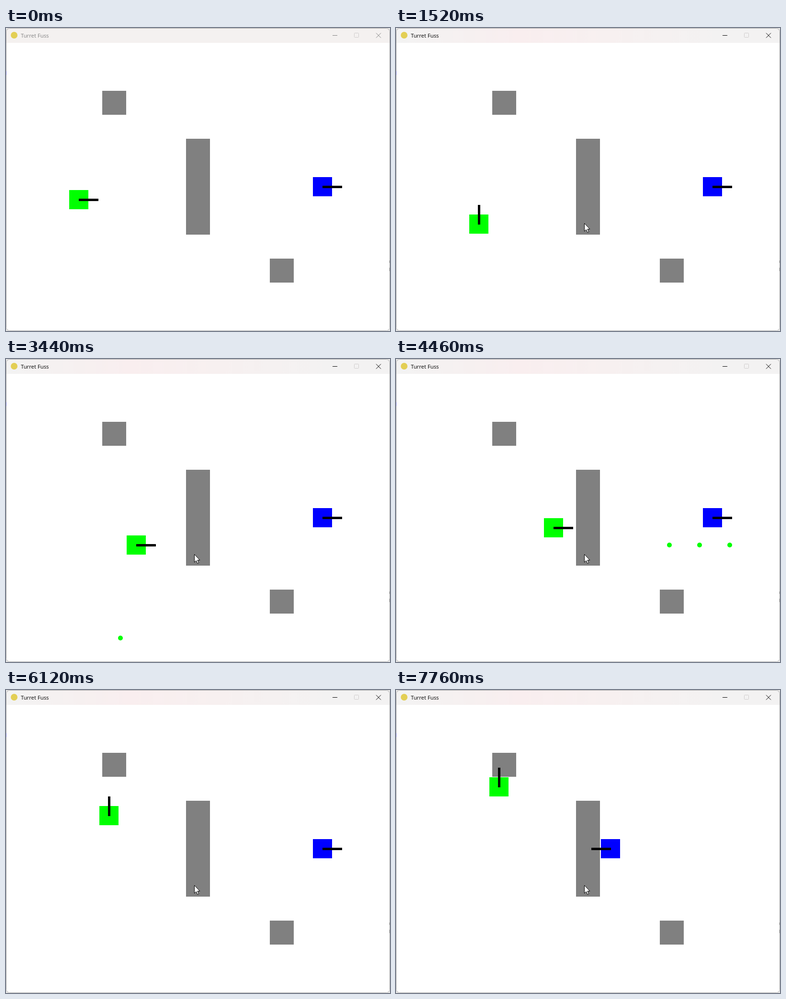
Recreate the animation shown at these times as an HTML page. Size 802 by 632 pixels, loop 8 s.

```html
<!DOCTYPE html>
<html lang="en">
<head>
<meta charset="utf-8">
<title>Turret Fuss</title>
<style>
html, body { margin: 0; width: 100%; height: 100%; overflow: hidden; background: #e4e4e4; }
svg { display: block; }
text { font: 11.3px "Open Sans", "Noto Sans", sans-serif; }
</style>
</head>
<body>
<svg width="802" height="632" viewBox="0 0 802 632">
  <defs>
    <linearGradient id="tint">
      <stop offset="0" stop-color="#f3f3f3"/>
      <stop offset=".13" stop-color="#f5f1f1"/>
      <stop offset=".32" stop-color="#f9eeef"/>
      <stop offset=".55" stop-color="#f7f0f0"/>
      <stop offset=".85" stop-color="#f3f2f2"/>
    </linearGradient>
    <clipPath id="win"><rect width="802" height="632" rx="8"/></clipPath>
    <clipPath id="field"><rect x="1" y="31" width="800" height="600"/></clipPath>
  </defs>
  <g clip-path="url(#win)">
    <rect width="802" height="632" fill="#fff"/>
    <g clip-path="url(#field)" shape-rendering="crispEdges">
      <g id="walls" fill="#808080"></g>
      <g id="tanks"></g>
      <g id="shots" fill="#0f0" shape-rendering="auto"></g>
    </g>
    <rect width="802" height="31" fill="#f4f1f0"/>
    <rect id="bar" width="802" height="31" fill="url(#tint)"/>
    <circle cx="17" cy="15" r="7" fill="#e3cf55"/>
    <g id="chrome">
      <text x="31" y="20">Turret Fuss</text>
      <path d="M682 15.5h10M773 10.5l10 10M783 10.5l-10 10" fill="none" stroke="currentColor"/>
    </g>
    <rect x="727.5" y="10.5" width="9" height="9" rx="1" fill="none" stroke="#d0cdcd"/>
    <rect x=".5" y=".5" width="801" height="631" rx="7.5" fill="none" stroke="#a3a3a3"/>
    <path d="M.5 90v8" stroke="#8080d0"/>
    <path d="M801.5 485v5M801.5 500v7" stroke="#555"/>
    <path id="cursor" d="M393.5 407.5v16.5l3.7-3.5 2.8 6 2.6-1.2-2.7-5.8h5z" fill="#fff" stroke="#000"/>
  </g>
</svg>
<script>
const LOOP = 8000, TICK = 16.5, STEP = 3, SHOT = 7, BARREL = 40;
const $ = id => document.getElementById(id);

const walls = [[201, 131, 50, 50], [376, 231, 50, 200], [551, 481, 50, 50]];
const dirs = {
  R: [1, 0], L: [-1, 0], U: [0, -1], D: [0, 1],
  UR: [1, -1], UL: [-1, -1], DR: [1, 1], DL: [-1, 1]
};

// "R21" drives right for 21 ticks, "-30" stands still for 30.
function drive(x, y, script) {
  const states = [{ x, y, dir: dirs.R }];
  let dir = dirs.R;
  for (const part of script.split(' ')) {
    const [, key, count] = part.match(/^(\D+)(\d+)$/);
    if (dirs[key]) dir = dirs[key];
    for (let i = 0; i < count; i++) {
      if (dirs[key]) { x += STEP * dir[0]; y += STEP * dir[1]; }
      states.push({ x, y, dir });
    }
  }
  return states;
}

const green = drive(152, 358,
  '-30 R21 DR6 D13 DL6 L8 UL6 U47 UR10 R4 DR8 D38 DR2 R9 -34 U9 UR3 R25 -17 L45 UL2 U48');
const blue = drive(661, 331, '-399 L71');
const fired = [104, 123, 164, 178, 215, 224, 233, 322, 333];

const at = (states, n) => states[Math.min(n, states.length - 1)];
const rect = (x, y, w, h, fill = '') =>
  `<rect x="${x}" y="${y}" width="${w}" height="${h}"${fill && ` fill="${fill}"`}/>`;

function barrel({ x, y, dir: [dx, dy] }) {
  if (!dy) return rect(dx > 0 ? x : x - BARREL, y - 2, BARREL + 1, 5);
  if (!dx) return rect(x - 2, dy > 0 ? y : y - BARREL, 5, BARREL + 1);
  const x2 = x + 28 * dx, y1 = dy > 0 ? y : y + 1, y2 = dy > 0 ? y + 29 : y - 28;
  return `<path d="M${x - 2} ${y1}H${x + 3}L${x2 + 3} ${y2}H${x2 - 2}z"/>`;
}

const tank = (s, fill) => rect(s.x - 20, s.y - 20, 40, 40, fill) + barrel(s);

const blocked = (x, y) => x < 1 || x > 801 || y < 31 || y > 633 ||
  walls.some(([l, t, w, h]) => x + 5 > l && x - 5 < l + w && y + 5 > t && y - 5 < t + h);

function shot(start, n) {
  if (n < start) return '';
  const { x, y, dir } = at(green, start);
  const reach = BARREL + SHOT * (n - start);
  const cx = x + dir[0] * reach, cy = y + dir[1] * reach;
  return blocked(cx, cy) ? '' : `<circle cx="${cx}" cy="${cy}" r="5"/>`;
}

function render(t) {
  const n = Math.floor(t / TICK + .5);
  $('tanks').innerHTML = tank(at(green, n), '#0f0') + tank(at(blue, n), '#00f');
  $('shots').innerHTML = fired.map(f => shot(f, n)).join('');

  const focus = Math.min(1, Math.max(0, (t - 100) / 190));
  const ink = Math.round(130 * (1 - focus));
  const color = `rgb(${ink},${ink},${ink})`;
  $('bar').setAttribute('opacity', focus);
  $('chrome').setAttribute('fill', color);
  $('chrome').setAttribute('color', color);
  $('cursor').setAttribute('visibility', t < 520 ? 'hidden' : 'visible');
}

$('walls').innerHTML = walls.map(w => rect(...w)).join('');
const begin = performance.now();
function loop() {
  render((performance.now() - begin) % LOOP);
  requestAnimationFrame(loop);
}
loop();
</script>
</body>
</html>
```
